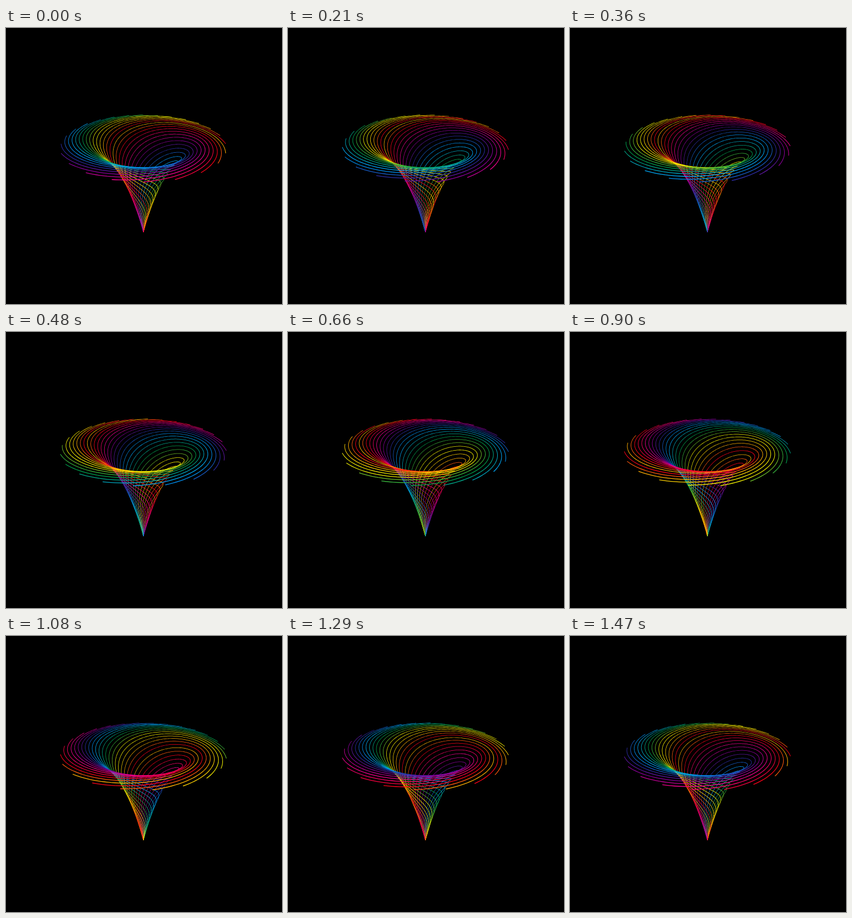
These frames come from a looping animation (500x500 px, 1500 ms). An HTML page with a canvas:

```html
<!DOCTYPE html>
<html lang="en">
<head>
<meta charset="utf-8">
<title>Spiral funnel</title>
<style>
  html, body { margin: 0; width: 100%; height: 100%; overflow: hidden; background: #000; }
  canvas { display: block; width: 500px; height: 500px; }
</style>
</head>
<body>
<canvas id="stage" width="500" height="500"></canvas>
<script>
const ctx = document.getElementById('stage').getContext('2d');

const LOOP = 1500, STEP = 30;
const ARMS = 24, POINTS = 180, CHUNK = 6, TAU = Math.PI * 2;

// Camera: lengths are in units of the rim radius.
const CX = 248.9, CY = 250.5, FOCAL = 306.6, DIST = 2.455;
const TILT_SIN = 0.527, TILT_COS = 0.85;

// Funnel profile.
const TOP = 0.471, HEIGHT = 1.955, FLARE = 3;
const LINE = 1.9;

// Colour stops over one palette cycle of 21 arms: [arm, r, g, b].
const CYCLE = 21;
const STOPS = [
  [0, 255, 0, 25], [2, 255, 175, 0], [4, 255, 245, 0], [5, 235, 235, 0],
  [6, 110, 190, 40], [8, 0, 165, 80], [11, 0, 170, 250], [12, 0, 140, 235],
  [14, 45, 45, 165], [16, 140, 0, 155], [18, 245, 0, 145], [21, 255, 0, 25]
];

function armColor(i) {
  const p = i % CYCLE;
  const k = STOPS.findIndex((s, n) => n > 0 && p <= s[0]);
  const a = STOPS[k - 1], b = STOPS[k];
  const u = (p - a[0]) / (b[0] - a[0]);
  const rgb = [1, 2, 3].map(c => Math.round(a[c] + (b[c] - a[c]) * u));
  return `rgb(${rgb})`;
}

const colors = Array.from({ length: ARMS }, (_, i) => armColor(i));

// Angle 0 faces the viewer, growing towards the right.
function project(r, angle) {
  const y = TOP - HEIGHT * Math.pow(1 - r, FLARE);
  const front = r * Math.cos(angle);
  const depth = DIST - y * TILT_SIN - front * TILT_COS;
  const scale = FOCAL / depth;
  return {
    x: CX + r * Math.sin(angle) * scale,
    y: CY - (y * TILT_COS - front * TILT_SIN) * scale,
    depth
  };
}

// One arm is a thin ribbon, cut into chunks that can be sorted by depth.
function armChunks(tip, color) {
  const pts = [];
  for (let i = 0; i <= POINTS; i++) {
    const s = i / POINTS;
    pts.push(project(1 - s, tip + TAU * s));
  }
  const edges = pts.map((p, i) => {
    const a = pts[Math.max(i - 1, 0)], b = pts[Math.min(i + 1, POINTS)];
    const dx = b.x - a.x, dy = b.y - a.y;
    const h = LINE / p.depth / 2 / (Math.hypot(dx, dy) || 1);
    return [[p.x - dy * h, p.y + dx * h], [p.x + dy * h, p.y - dx * h]];
  });
  const chunks = [];
  for (let i = 0; i < POINTS; i += CHUNK) {
    const part = edges.slice(i, i + CHUNK + 1);
    const outline = part.map(e => e[0]).concat(part.map(e => e[1]).reverse());
    chunks.push({ outline, color, depth: pts[i + CHUNK / 2].depth });
  }
  return chunks;
}

function drawChunk({ outline, color }) {
  ctx.fillStyle = color;
  ctx.beginPath();
  for (const [x, y] of outline) ctx.lineTo(x, y);
  ctx.closePath();
  ctx.fill();
}

function draw(ms) {
  const turn = Math.floor((ms % LOOP) / STEP) * STEP / LOOP * TAU;
  const first = TAU * 5 / ARMS;
  ctx.fillStyle = '#000';
  ctx.fillRect(0, 0, 500, 500);
  colors
    .flatMap((c, i) => armChunks(first + TAU * i / ARMS + turn, c))
    .sort((a, b) => b.depth - a.depth)
    .forEach(drawChunk);
}

let start = null;
function tick(now) {
  if (start === null) start = now;
  draw(now - start);
  requestAnimationFrame(tick);
}
draw(0);
requestAnimationFrame(tick);
</script>
</body>
</html>
```
